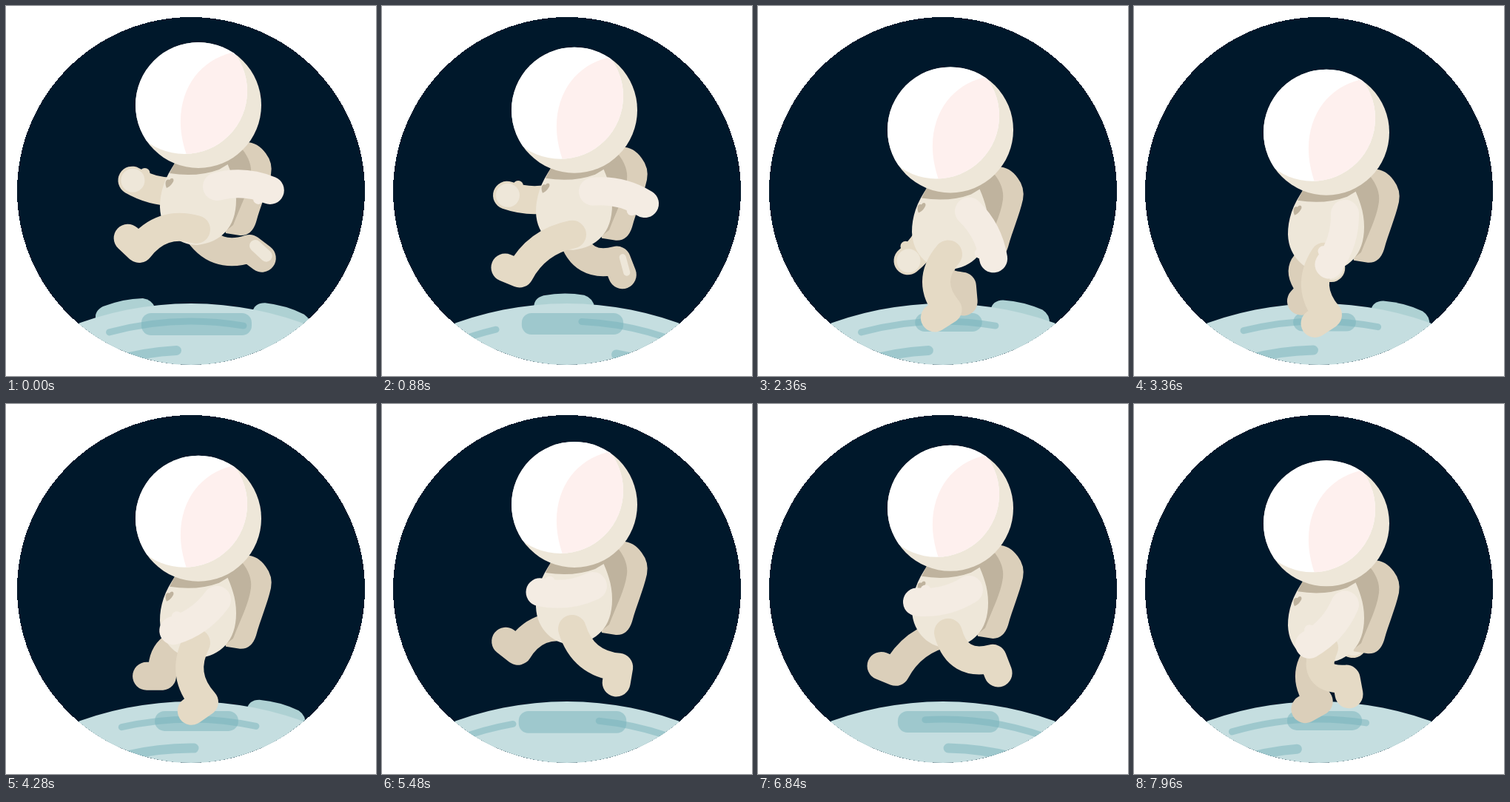
An HTML page that plays this animation: 500x500 px, repeating every 8 s.

```html
<!DOCTYPE html>
<html lang="en">
<head>
<meta charset="utf-8">
<title>Moon run</title>
<style>
  html, body { margin: 0; width: 100%; height: 100%; overflow: hidden; background: #fff; }
  svg { display: block; width: 100vw; height: 100vh; }
  .line { fill: none; stroke-width: 38; stroke-linecap: round; stroke-linejoin: round; }
  .mark { stroke: #79b4bc; stroke-opacity: .5; }
  .suit { fill: #eee7d9; }
  .shade { fill: #bfb39e; }
  .pack { fill: #dbcfba; }
</style>
</head>
<body>
<svg viewBox="0 0 500 500">
  <defs>
    <clipPath id="port"><circle cx="250" cy="250" r="235"/></clipPath>
    <clipPath id="helmet"><circle cx="260" cy="134" r="85"/></clipPath>
    <clipPath id="visor"><circle cx="241" cy="115" r="85"/></clipPath>
    <path id="rock" d="M209 408Q208 395 222 391Q250 386 277 391Q289 395 291 408Z" fill="#aed1d3"/>
  </defs>
  <circle cx="250" cy="250" r="235" fill="#00182b" shape-rendering="crispEdges"/>
  <g clip-path="url(#port)">
    <use id="rockA" href="#rock"/>
    <use id="rockB" href="#rock"/>
    <circle cx="250" cy="844" r="442" fill="#c5dee0"/>
    <rect id="shadow" y="415" rx="13" fill="#79b4bc" fill-opacity=".5"/>
    <g id="marks"></g>
  </g>

  <g id="farArm">
    <path class="line" stroke="#e5dac5"/>
    <circle r="7" fill="#e5dac5"/>
    <circle id="glove" r="16" class="suit"/>
  </g>
  <path id="farLeg" class="line" stroke="#dbcfba"/>
  <path id="sole" class="line" stroke="#eee7d9"/>

  <g class="bob">
    <path class="pack" d="M310 187Q335 177 351 199Q361 212 358 228C353 250 344 270 338 292Q332 311 316 310L297 307L280 220Z"/>
    <path class="shade" d="M300 190L318 192Q333 210 331 228C328 250 317 270 307 296L297 304L280 230Z"/>
    <path class="suit" d="M230 210C214 232 208 252 208 272C209 305 235 324 259 323C290 319 311 300 311 262C311 240 304 225 298 210Z"/>
    <path class="shade" d="M230 208L221 226Q258 232 288 221L318 203L310 190Z"/>
    <path class="shade" d="M217 246C214 239 216 233 221 235C224 230 229 234 225 239Q222 244 217 246Z"/>
  </g>
  <path id="nearLeg" class="line" stroke="#e5dac5"/>
  <g id="nearArm">
    <path class="line" stroke="#f4ece3"/>
    <circle r="7" fill="#f4ece3"/>
  </g>
  <g class="bob">
    <circle cx="260" cy="134" r="85" class="suit"/>
    <g clip-path="url(#helmet)">
      <circle cx="241" cy="115" r="85" fill="#fff"/>
      <path clip-path="url(#visor)" fill="#fef0ee" d="M305 63C252 76 220 132 244 201L340 201V63Z"/>
    </g>
  </g>
</svg>
<script>
const LOOP = 8000;
const STRIDE = 11900; // ms for one full run cycle
const TAU = 2 * Math.PI;
const RAD = Math.PI / 180;

// Smooth, overshoot-free curve through [x, ...values] points, level at both ends.
function curve(points) {
  const slope = (k, c) => (points[k + 1][c] - points[k][c]) / (points[k + 1][0] - points[k][0]);
  const tangent = (k, c) => {
    if (k === 0 || k === points.length - 1) return 0;
    const a = slope(k - 1, c), b = slope(k, c);
    return a * b <= 0 ? 0 : 2 * a * b / (a + b);
  };
  return x => {
    let k = 0;
    while (k < points.length - 2 && x >= points[k + 1][0]) k++;
    const span = points[k + 1][0] - points[k][0];
    const u = (x - points[k][0]) / span, v = 1 - u;
    return points[k].map((start, c) =>
      start * v * v * (1 + 2 * u) + points[k + 1][c] * u * u * (3 - 2 * u) +
      span * u * v * (v * tangent(k, c) - u * tangent(k + 1, c))).slice(1);
  };
}

// One step cycle, shared by both legs: phase, heel from hip (x, y), foot angle.
const gait = curve([
  [0, -77, 26, 223],     // reach forward
  [.075, -71, 53, 202],
  [.185, -2, 74, 148],   // land
  [.36, 11, 80, 145],
  [.46, 63, 52, 100],    // push off
  [.5, 72, 26, 37],
  [.575, 60, 35, 69],
  [.69, 22, 43, 83],     // swing through
  [.86, -46, 45, 180],
  [1, -77, 26, 223]
]);

// Ground angle by phase: quick in the air, nearly still while a foot is down.
const groundTurn = curve([
  [-.05, -11], [0, 0], [.074, 18.1], [.198, 41.2], [.36, 43.6],
  [.46, 62.4], [.575, 94.5], [.669, 122.6], [.72, 137]
]);

const el = id => document.getElementById(id);
const set = (node, attrs) => {
  for (const name in attrs) node.setAttribute(name, attrs[name]);
};
const bobs = document.querySelectorAll('.bob');

// Bands painted on the moon: radius, width, then degrees, and speed.
const bands = [
  { r: 417, w: 9, start: -16, length: 26.4, gap: 41.2, speed: 1 },
  { r: 378, w: 13, start: -18, length: 16, gap: 61.8, speed: 1.5 }
];
for (const band of bands) {
  band.paths = [0, 1].map(() => {
    const path = document.createElementNS('http://www.w3.org/2000/svg', 'path');
    set(path, { class: 'line mark', style: `stroke-width:${band.w}` });
    return el('marks').appendChild(path);
  });
}

const onMoon = (r, degrees) =>
  `${250 + r * Math.sin(degrees * RAD)} ${843 - r * Math.cos(degrees * RAD)}`;

function drawGround(turn, drop) {
  const rock = .62 * turn - 11.7;
  set(el('rockA'), { transform: `rotate(${rock} 250 843)` });
  set(el('rockB'), { transform: `rotate(${rock + 28} 250 843)` });
  const width = 149 - 1.75 * drop;
  set(el('shadow'), { x: 257.5 - width / 2, width, height: 30 - .15 * drop });

  for (const { r, w, start, length, gap, speed, paths } of bands) {
    const cap = w / 2 / r / RAD;
    const shift = (turn * speed + 5) % gap - 5;
    paths.forEach((path, i) => {
      const from = start + shift - i * gap;
      set(path, { d: `M${onMoon(r, from + cap)}A${r} ${r} 0 0 1 ${onMoon(r, from + length - cap)}` });
    });
  }
}

// Two equal bones from the hip; the knee follows from the heel position.
function drawLeg(node, drop, phase) {
  const [dx, dy, angle] = gait(phase % 1);
  const hx = 257, hy = 302 + drop;
  const reach = Math.hypot(dx, dy);
  const bend = Math.sqrt(Math.max(0, 49 ** 2 - reach ** 2 / 4)) / reach;
  const heel = [hx + dx, hy + dy];
  const toe = [heel[0] + 21 * Math.cos(angle * RAD), heel[1] + 21 * Math.sin(angle * RAD)];
  const knee = [hx + dx / 2 - dy * bend, hy + dy / 2 + dx * bend];
  set(node, { d: `M${hx} ${hy}Q${knee} ${heel}L${toe}` });
  return { heel, toe };
}

// An arm swings from the shoulder; the angle is measured from straight down.
function drawArm(group, sx, sy, angle) {
  const [arm, thumb] = group.children;
  const length = 72, bend = 12;
  const ux = Math.sin(angle * RAD), uy = Math.cos(angle * RAD);
  const hx = sx + length * ux, hy = sy + length * uy;
  const ex = sx + length / 2 * ux + bend * uy, ey = sy + length / 2 * uy - bend * ux;
  const fore = Math.hypot(hx - ex, hy - ey);
  const fx = (hx - ex) / fore, fy = (hy - ey) / fore;
  set(arm, { d: `M${sx} ${sy}Q${ex} ${ey} ${hx} ${hy}` });
  set(thumb, { cx: hx - 10 * fx - 17 * fy, cy: hy - 10 * fy + 17 * fx });
  return { hx, hy };
}

function draw(t) {
  const phase = t / STRIDE;
  const fromApex = Math.abs(2 * phase - Math.round(2 * phase));
  const drop = 21 * (1 - Math.cos(5.55 * fromApex));
  const swing = 86 * Math.cos(TAU * phase);

  for (const bob of bobs) set(bob, { transform: `translate(0 ${drop})` });
  drawGround(groundTurn(phase)[0], drop);

  drawLeg(el('nearLeg'), drop, phase);
  const { heel, toe } = drawLeg(el('farLeg'), drop, phase + .5);
  const patch = 16 * Math.max(0, 1 - phase / .17);
  set(el('sole'), {
    d: `M${heel[0] + 8} ${heel[1] - 4}L${toe[0] + 6} ${toe[1] - 3}`,
    style: `stroke-width:${patch}`,
    visibility: patch ? 'visible' : 'hidden'
  });

  drawArm(el('nearArm'), 285, 244 + drop, swing);
  const { hx, hy } = drawArm(el('farArm'), 241, 250 + drop, -1.18 * swing);
  set(el('glove'), { cx: hx + 1, cy: hy });
}

const begin = performance.now();
function tick() {
  draw((performance.now() - begin) % LOOP);
  requestAnimationFrame(tick);
}
tick();
</script>
</body>
</html>
```
